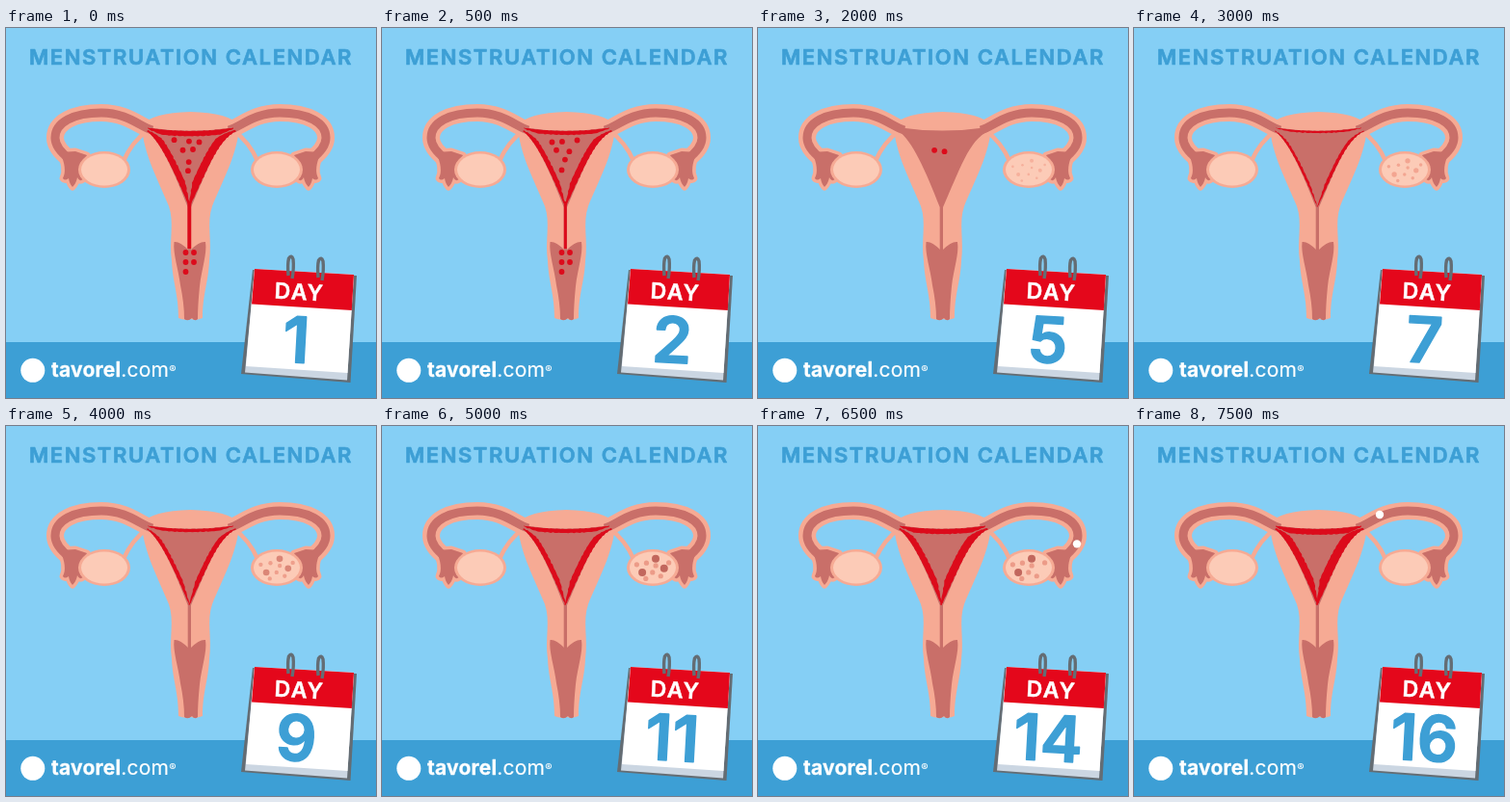
Write an HTML page with a canvas that moves like this. It is 384 px wide and 384 px high and loops after 8000 ms.

```html
<!DOCTYPE html>
<html lang="en">
<head>
<meta charset="utf-8">
<title>Menstruation calendar</title>
<style>
html, body { margin: 0; width: 100%; height: 100%; overflow: hidden; background: #85cff5; }
canvas { display: block; width: 384px; height: 384px; }
</style>
</head>
<body>
<canvas id="stage" width="384" height="384"></canvas>
<script>
const ctx = document.getElementById('stage').getContext('2d');
const DAY_MS = 500, DAYS = 16, AXIS = 191.5, CANAL = 190.3;
const SKY = '#85cff5', BLUE = '#3d9fd5', SKIN = '#f6aa94', FLESH = '#c96f69',
      OVARY = '#fccbb7', RED = '#dc0b1b', GREY = '#646d74', SHADE = '#cbd6e2';
const FONT = 'Inter, "Open Sans", sans-serif';

const tube = new Path2D('M152 106 C140 103 126 88 99 88 C70 88 51 98 51 114 C51 123 58 130 66 136');
const fimbria = new Path2D('M56 129 L72 128 L84 132 Q75 144 80 157 Q76 160 74 155 Q73 161 69 165 ' +
  'Q66 162 65 156 Q61 159 59 156 Q64 146 56 129Z');
const ligament = new Path2D('M122 138 Q130 119 147 106');
const body = new Path2D('M141 101 Q151 88 191.5 87 Q232 88 242 101 C241 130 224 160 214 185 ' +
  'C208 202 214 220 211 242 C210 264 204 276 204 301 Q198 304 191.5 302 Q185 304 179 301 ' +
  'C179 276 173 264 172 242 C169 220 175 202 169 185 C159 160 142 130 141 101Z');
const cavity = new Path2D('M144 103 Q191 110 239 103 L239 107 C219 116 209 148 192 186 ' +
  'L192 231 L188.7 231 L188.7 186 C174 148 160 117 146 107Z');
const cervix = new Path2D('M174.5 222 Q180 221 189 230 L192 230 Q201 221 207 222 ' +
  'C209 234 203 250 201 268 Q199 288 199 302 Q196 305 193 301 Q189 305 185 302 ' +
  'Q185 286 181 267 C179 250 173 234 174.5 222Z');

const clamp = v => Math.max(0, Math.min(1, v));
const jag = i => Math.sin(i * 2.1) * .5 + Math.sin(i * 3.7) * .3;

function bezier([a, b, c, d], u) {
  const v = 1 - u;
  return a * v * v * v + 3 * b * v * v * u + 3 * c * v * u * u + d * u * u * u;
}

function mix(a, b, k) {
  return `rgb(${a.map((v, i) => Math.round(v + (b[i] - v) * k)).join()})`;
}

function fill(path, color) { ctx.fillStyle = color; ctx.fill(path); }

function line(path, color, width) {
  ctx.strokeStyle = color;
  ctx.lineWidth = width;
  ctx.stroke(path);
}

function oval(x, y, rx, ry, color) {
  ctx.fillStyle = color;
  ctx.beginPath();
  ctx.ellipse(x, y, rx, ry, 0, 0, Math.PI * 2);
  ctx.fill();
}

function dot(x, y, r, color) { oval(x, y, r, r, color); }

function poly(points, color) {
  ctx.fillStyle = color;
  ctx.beginPath();
  points.forEach(p => ctx.lineTo(...p));
  ctx.closePath();
  ctx.fill();
}

function bothSides(draw) {
  draw();
  ctx.save();
  ctx.translate(2 * AXIS, 0);
  ctx.scale(-1, 1);
  draw();
  ctx.restore();
}

// draws text with softened corners and returns its width
function text(str, x, y, size, weight, color, spacing = 0, align = 'center', round = .5) {
  ctx.font = `${weight} ${size}px ${FONT}`;
  ctx.letterSpacing = spacing + 'px';
  ctx.textAlign = align;
  ctx.fillStyle = ctx.strokeStyle = color;
  ctx.lineWidth = round;
  ctx.fillText(str, x, y);
  ctx.strokeText(str, x, y);
  return ctx.measureText(str).width;
}

// sheds over four days, then builds up again
function liningAt(day) {
  return day < 5 ? 6.4 * (5 - day) / 4 : 7 * ((day - 5) / 11) ** .6;
}

// a ragged band along a curve; inset gives the offset of its inner edge
function band(xs, ys, inset) {
  const n = 44, outer = [], inner = [];
  for (let i = 0; i <= n; i++) {
    const u = i / n, x = bezier(xs, u), y = bezier(ys, u);
    const [dx, dy] = inset(u);
    outer.push([x + jag(i) * .5, y + jag(i + 3) * .3]);
    inner.unshift([x + dx + jag(i + 9) * .6, y + dy + jag(i + 5) * .5]);
  }
  poly(outer.concat(inner), RED);
}

function drawLining(thick) {
  if (!thick) return;
  const sideY = [107, 117, 148, 186];
  const side = w => u => {
    const k = w * Math.min(1, .25 + u * 3, .15 + (1 - u) * 4);
    return [k * .92, -Math.abs(k) * .42];
  };
  band([146, 160, 174, CANAL], sideY, side(thick));
  band([239, 219, 209, CANAL], sideY, side(-thick * 1.3));
  band([147, 177, 206, 236], [103.5, 108, 108, 103.5],
    u => [0, thick * .85 * Math.min(1, .2 + 5 * Math.min(u, 1 - u))]);
}

function drawBleeding(day) {
  const left = 5 - day;
  if (left < 0) return;
  if (left) line(new Path2D(`M${CANAL} 180 V229`), RED, .5 + left * .85);
  // wide rows first, so the middle pair is the last to go
  const drops = [];
  for (const [row, count] of [[1, 2], [0, 3], [2, 1], [3, 1]]) {
    for (let i = 0; i < count; i++) {
      drops.push([188.5 + (i - (count - 1) / 2) * 14, 117 + row * 10.5]);
    }
  }
  drops.slice(0, 3 * left + 2).forEach(([x, y], i) =>
    dot(x + 2 * Math.sin(day * 1.7 + i * 2.3), y + 1.5 * Math.cos(day * 2.1 + i), 2.9, RED));
  for (let i = 0; i < Math.min(5, 3 * left); i++) {
    dot(186.5 + i % 2 * 8.5, 233 + Math.floor(i / 2) * 10, 2.9, RED);
  }
}

// spiral of follicles: three of them ripen, one becomes the egg
function drawFollicles(day) {
  const grow = clamp((day - 2) / 9), ripe = clamp((day - 7) / 4);
  if (!grow || day > 14) return;
  for (let i = 0; i < 10; i++) {
    const main = i >= 3 && i <= 5;
    if (i === 3 && day >= 13) continue;
    const a = i * 2.4 - .8, d = Math.sqrt((i + .5) / 9);
    const size = (main ? 4 : 2.6) * (.25 + .75 * grow);
    const pink = mix([252, 203, 183], [243, 164, 144], clamp(.3 + grow * 1.2));
    const color = ripe ? mix([243, 164, 144], [194, 103, 93], ripe * (main ? 1 : .15)) : pink;
    dot(281 + 19 * d * Math.cos(a), 147 + 12 * d * Math.sin(a), size, color);
  }
}

// from the ovary round through the tube
function drawEgg(day) {
  if (day < 13) return;
  const u = (day - 13) / 3;
  dot(bezier([294, 360, 335, 255], u), bezier([148, 128, 82, 92], u), 4.2, '#fff');
}

function drawOrgan(day) {
  bothSides(() => {
    line(ligament, SKIN, 4.5);
    line(tube, SKIN, 18);
    line(fimbria, SKIN, 7);
  });
  fill(body, SKIN);
  bothSides(() => {
    line(tube, FLESH, 9);
    fill(fimbria, FLESH);
    oval(102, 147, 27, 19, SKIN);
    oval(102, 147, 24, 16.5, OVARY);
  });
  fill(cavity, FLESH);
  fill(cervix, FLESH);
  drawLining(liningAt(day));
  drawBleeding(day);
  drawFollicles(day);
  drawEgg(day);
}

function drawCalendar(day) {
  poly([[256, 251], [364, 257], [357.5, 368], [244, 359]], GREY);
  poly([[258, 250], [361, 256], [354, 365.5], [248, 357.5]], SHADE);
  poly([[258, 250], [361, 256], [354.5, 358], [249, 351]], '#fff');
  poly([[258, 250], [361, 256], [358.8, 293], [255, 286.5]], '#e4071b');
  for (const [x, y] of [[293, 238], [324, 240]]) {
    line(new Path2D(`M${x} ${y + 19} Q${x - 1} ${y + 7} ${x + .5} ${y + 1} q3 -4 4.5 1 q1 9 -1 20`), GREY, 3.4);
  }
  ctx.save();
  ctx.translate(304, 274);
  ctx.rotate(.055);
  text('DAY', .5, 8, 23, 600, '#fff', 1.5);
  text(String(day), 0, 73.5, 66, 600, BLUE, 0, 'center', 1.5);
  ctx.restore();
}

function drawBrand() {
  dot(27.8, 355.3, 12.5, '#fff');
  let x = 47;
  x += text('tavorel', x, 362, 21, 700, '#fff', .2, 'left', .3);
  x += text('.com', x, 362, 21, 400, '#fff', .2, 'left', .2);
  text('®', x, 358, 11, 500, '#fff', 0, 'left', .1);
}

function draw(day) {
  ctx.lineJoin = 'round';
  ctx.fillStyle = SKY;
  ctx.fillRect(0, 0, 384, 384);
  ctx.fillStyle = BLUE;
  ctx.fillRect(0, 326, 384, 58);
  text('MENSTRUATION CALENDAR', 192, 38, 22, 600, BLUE, 1.6, 'center', .7);
  drawOrgan(day);
  drawBrand();
  drawCalendar(day);
}

const start = performance.now();
function tick() {
  const t = performance.now() - start;
  draw(Math.floor(t / DAY_MS) % DAYS + 1);
  requestAnimationFrame(tick);
}
tick();
</script>
</body>
</html>
```
